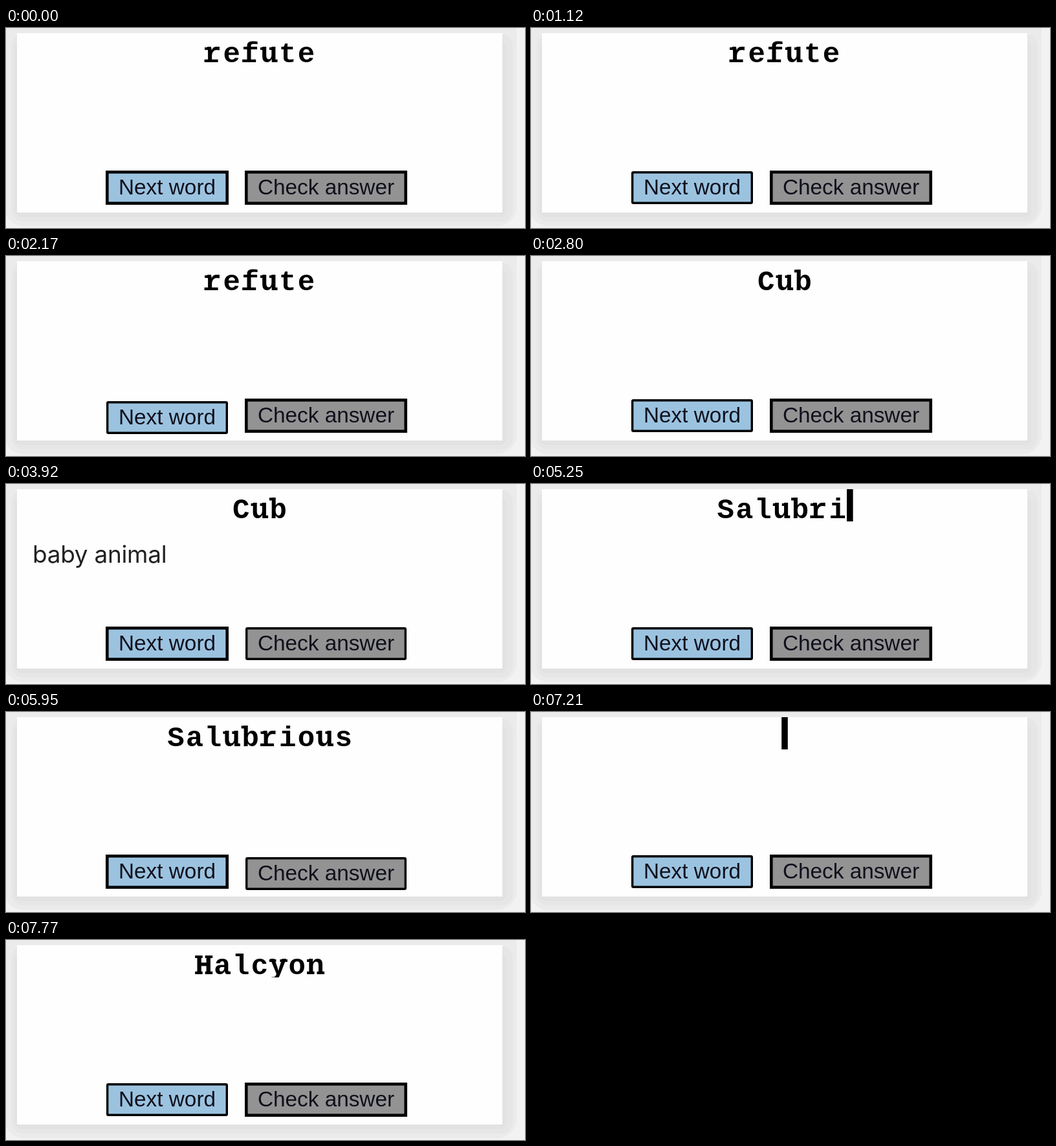
Animation of 802 by 310 pixels, one loop 8000 ms. Source, as an HTML page:

```html
<!DOCTYPE html>
<html lang="en">
<head>
<meta charset="utf-8">
<title>Word cards</title>
<style>
  html, body { margin: 0; width: 100%; height: 100%; overflow: hidden; background: #f2f2f2; }
  svg { display: block; width: 802px; height: 310px; }
  .word { font: bold 44px "Liberation Mono", monospace; letter-spacing: 2.4px; white-space: pre; }
  .meaning { font: 37px Inter, sans-serif; letter-spacing: -0.3px; fill: #222; }
  .label { font: 33.33px "Liberation Sans", Arial, sans-serif; text-anchor: middle; fill: #10101c; }
</style>
</head>
<body>
<svg viewBox="0 0 802 310" xmlns="http://www.w3.org/2000/svg">
  <defs><clipPath id="line"><rect x="17" y="8" width="750" height="50"/></clipPath></defs>
  <rect width="802" height="310" fill="#f2f2f2"/>
  <rect x="-3" y="-40" width="792" height="347" rx="30" fill="#ebebeb"/>
  <rect x="9" y="10" width="774" height="290" rx="18" fill="#e6e6e6"/>
  <rect x="14" y="20" width="759" height="273" rx="10" fill="#e2e2e2"/>
  <rect x="17" y="8" width="750" height="278" fill="#fefefe"/>
  <g clip-path="url(#line)">
    <text id="word" class="word" y="53"></text>
    <path id="slabs" fill="none" stroke="#000" stroke-width="4.2"/>
    <rect id="caret" y="8" width="9.6" height="50"/>
  </g>
  <text id="meaning" class="meaning" x="41" y="122"></text>
  <g id="next">
    <rect fill="#9bc3e0" stroke="#000"/>
    <text class="label" x="249" y="258.3">Next word</text>
  </g>
  <g id="check">
    <rect fill="#939393" stroke="#000"/>
    <text class="label" x="494.5" y="258.3">Check answer</text>
  </g>
</svg>
<script>
const LOOP = 8000, TICK = 70;
const PITCH = 28.8, CARET = 9.6, MID = 392;
const $ = id => document.getElementById(id);

const cards = [
  { at: 0, text: 'refute', done: 0 },
  { at: 2240, text: 'Cub', start: 2200, done: 2800, meaning: 'baby animal', reveal: 3920 },
  { at: 4830, text: 'Salubrious', start: 4790, done: 5460, meaning: 'health giving', reveal: 6020 },
  { at: 7210, text: 'Halcyon', start: 7145, done: 7770 }
];

// time, next, check: 0 idle, 1 hover, 2 pressed
const pointer = [
  [0, 0, 0], [1120, 1, 0], [2170, 2, 0], [2240, 1, 0],
  [3710, 0, 0], [3780, 0, 1], [3850, 0, 2], [3920, 0, 1],
  [4690, 1, 0], [4760, 2, 0], [4830, 1, 0],
  [5880, 0, 1], [5950, 0, 2], [6020, 0, 1],
  [7000, 1, 0], [7070, 2, 0], [7210, 1, 0]
];

// slab serifs per letter: height, from, to within the cell
const BASE = 50.9, MEAN = 32, CAP = 26, TOP = 23.3;
const slabs = {
  r: [[BASE, 1, 22], [MEAN, 1.5, 8]],
  f: [[BASE, 2, 23]],
  u: [[MEAN, 1, 7], [MEAN, 15, 21], [BASE, 20, 27.5]],
  b: [[TOP, 0.5, 7]],
  a: [[BASE, 21, 27]],
  n: [[MEAN, 1, 6], [BASE, 1, 12.5], [BASE, 16.5, 28]],
  H: [[CAP, 1, 12.5], [CAP, 16.5, 28], [BASE, 1, 12.5], [BASE, 16.5, 28]],
  y: [[MEAN, 0.5, 11], [MEAN, 17, 28.5]]
};

const latest = (list, t, key) => list.filter(item => item[key] <= t).pop();

function drawWord(card, t) {
  const typing = t < card.done;
  const size = card.text.length;
  const typed = typing ? Math.min(size - 1, Math.floor((t - card.start) * size / 600)) : size;
  const shown = card.text.slice(0, typed);
  const left = MID - (typed * PITCH + (typing ? CARET : 0)) / 2;
  $('word').textContent = shown;
  $('word').setAttribute('x', left + 1.2);
  $('slabs').setAttribute('d', [...shown].map((ch, i) =>
    (slabs[ch] || []).map(([y, a, b]) => {
      const x = left + i * PITCH;
      return `M${x + a} ${y}H${x + b}`;
    }).join('')).join(''));
  $('caret').setAttribute('x', left + typed * PITCH);
  $('caret').setAttribute('visibility', typing ? 'visible' : 'hidden');
}

function drawButton(id, x, width, state) {
  const line = state ? 3.4 : 4.6;
  const inset = (state ? 1 : 0) + line / 2;
  const box = {
    x: x + inset, y: 221 + inset, width: width - 2 * inset, height: 53 - 2 * inset,
    rx: state ? 1.5 : 0, 'stroke-width': line
  };
  const rect = $(id).firstElementChild;
  for (const name in box) rect.setAttribute(name, box[name]);
  $(id).setAttribute('transform', `translate(0 ${state === 2 ? 3 : 0})`);
}

function draw(time) {
  const t = Math.floor(time % LOOP / TICK) * TICK;
  const card = latest(cards, t, 'at');
  const [, next, check] = latest(pointer, t, 0);
  drawWord(card, t);
  $('meaning').textContent = t >= card.reveal ? card.meaning : '';
  drawButton('next', 154, 190, next);
  drawButton('check', 369, 251, check);
}

const begin = performance.now();
function frame() {
  draw(performance.now() - begin);
  requestAnimationFrame(frame);
}
frame();
</script>
</body>
</html>
```
